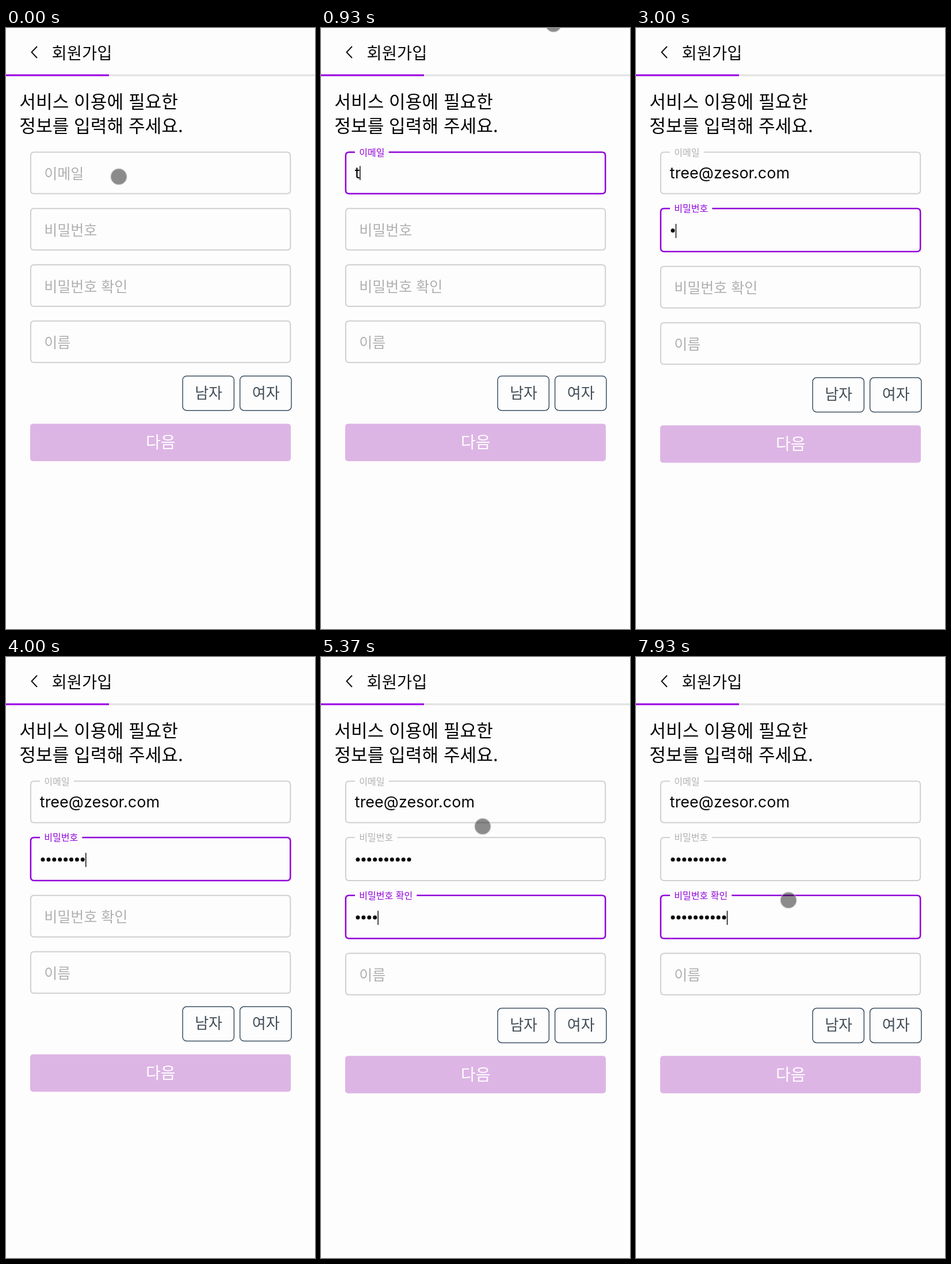
Animation of 537 by 1043 pixels, one loop 8000 ms. Source, as an HTML page:

```html
<!DOCTYPE html>
<html lang="ko">
<head>
<meta charset="utf-8">
<title>회원가입</title>
<style>
  html, body { margin: 0; width: 100%; height: 100%; overflow: hidden; background: #fdfdfd; }
  svg { display: block; width: 537px; height: 1043px; }
  text { font-family: "Noto Sans CJK KR", "Noto Sans CJK", sans-serif; font-weight: 500; }
  .entry { font-family: Inter, "Noto Sans", sans-serif; font-weight: 400; white-space: pre; }
</style>
</head>
<body>
<svg id="stage" viewBox="0 0 537 1043"></svg>
<script>
const LOOP = 8000;
const FOCUS_MS = 167;
const GROWTH = 2.8;
const DOT_STEP = 9.9;
const EMAIL = 'tree@zesor.com';
const GRAY = [208, 208, 210];
const HINT = [176, 176, 176];
const PURPLE = [145, 0, 218];

// Focus and blur times, and the time of each keystroke
const fields = [
  { label: '이메일', focus: 100, blur: 2760, value: EMAIL,
    keys: [900, 1030, 1140, 1250, 1600, 1900, 2000, 2110, 2220, 2310, 2390, 2460, 2570, 2670] },
  { label: '비밀번호', focus: 2760, blur: 4597,
    keys: [2970, 3080, 3200, 3310, 3600, 3720, 3850, 3970, 4090, 4210] },
  { label: '비밀번호 확인', focus: 4597, blur: Infinity,
    keys: [4880, 5000, 5130, 5330, 6730, 6900, 6970, 7130, 7270, 7460] },
  { label: '이름', focus: Infinity, blur: Infinity, keys: [] }
];

// Pointer position: time, x, y
const pointerPath = [
  [0, 196, 258], [250, 196, 258], [890, 404, -7], [2750, 404, -7],
  [5230, 276, 278], [5370, 281, 294], [5560, 282, 300],
  [7580, 282, 300], [7930, 265, 422]
];

const stage = document.getElementById('stage');
const clamp = v => Math.max(0, Math.min(1, v));
const lerp = (a, b, p) => a + (b - a) * p;
const smooth = p => p * p * (3 - 2 * p);
const easeOut = p => 1 - (1 - p) ** 2;
const mix = (a, b, p) => `rgb(${a.map((v, i) => Math.round(lerp(v, b[i], p)))})`;

function set(node, attrs) {
  for (const key in attrs) node.setAttribute(key, attrs[key]);
  return node;
}

function add(parent, tag, attrs) {
  const node = document.createElementNS('http://www.w3.org/2000/svg', tag);
  return parent.appendChild(set(node, attrs));
}

// Places text by its visual middle
function addText(parent, string, x, middle, size, fill, anchor = 'start') {
  const node = add(parent, 'text', {
    x, y: middle + size * 0.37, 'font-size': size, fill, 'text-anchor': anchor
  });
  node.textContent = string;
  return node;
}

function buildHeader() {
  add(stage, 'path', { d: 'M54 32 L44.5 42 L54 52', fill: 'none', stroke: '#111', 'stroke-width': 2 });
  addText(stage, '회원가입', 79.5, 43.7, 28.5, '#0a0a0a');
  add(stage, 'rect', { x: 0, y: 80.5, width: 537, height: 3, fill: '#e1e1e1' });
  add(stage, 'rect', { x: 0, y: 80.5, width: 179, height: 3, fill: '#9b00e8' });
  addText(stage, '서비스 이용에 필요한', 23.3, 127.3, 31.2, '#050505');
  addText(stage, '정보를 입력해 주세요.', 23.3, 169.3, 31.2, '#050505');
}

function buildField(field) {
  const group = field.group = add(stage, 'g', {});
  field.border = add(group, 'path', { fill: 'none' });
  field.tag = addText(group, field.label, 66.3, 0, 16, '#000');
  field.gap = field.tag.getComputedTextLength() + 14.5;
  if (field.value) {
    field.entry = add(group, 'text', { class: 'entry', x: 58.8, y: 45, 'font-size': 27, fill: '#080808' });
  } else {
    field.dots = field.keys.map((_, i) =>
      add(group, 'circle', { cx: 64 + DOT_STEP * i, r: 3.5, fill: '#080808' }));
  }
  field.caret = add(group, 'rect', { width: 1.5, height: 24.5, fill: '#111' });
}

function buildFooter() {
  const group = add(stage, 'g', {});
  [['남자', 307], ['여자', 406.6]].forEach(([label, x]) => {
    add(group, 'rect', {
      x, y: 604, width: 89.3, height: 59.8, rx: 7,
      fill: 'none', stroke: '#3c5062', 'stroke-width': 1.5
    });
    addText(group, label, x + 45.1, 633, 26, '#424d57', 'middle');
  });
  add(group, 'rect', { x: 42, y: 686.7, width: 453, height: 65, rx: 5, fill: '#ddb5e5' });
  addText(group, '다음', 268.7, 719, 28, '#fff', 'middle');
  return group;
}

// Rounded outline whose top edge is open from x = 59 by the gap
function outline(height, gap) {
  const l = 42.9, r = 494.2, c = 6;
  const end = gap > 0 ? 'L59 0' : 'L59 0 Z';
  return `M${59 + gap} 0 L${r - c} 0 Q${r} 0 ${r} ${c} L${r} ${height - c} Q${r} ${height} ${r - c} ${height} ` +
    `L${l + c} ${height} Q${l} ${height} ${l} ${height - c} L${l} ${c} Q${l} 0 ${l + c} 0 ${end}`;
}

function drawField(field, top, t) {
  const typed = field.keys.filter(k => k <= t).length;
  const grown = field.dots && typed ? GROWTH : 0;
  const rise = easeOut(clamp((t - field.focus) / FOCUS_MS));
  const fade = smooth(clamp((t - field.blur) / FOCUS_MS));
  const active = rise * (1 - fade);
  const size = lerp(25, 16, rise);

  set(field.group, { transform: `translate(0 ${top})` });
  set(field.border, {
    d: outline(72 + grown, field.gap * clamp((rise - 0.75) * 4)),
    stroke: mix(GRAY, PURPLE, active),
    'stroke-width': lerp(2, 2.5, active)
  });
  set(field.tag, {
    y: lerp(37.5, 0.2, rise) + size * 0.37,
    'font-size': size,
    fill: mix(HINT, PURPLE, active)
  });

  let caretX = 58.8 + DOT_STEP * typed;
  if (field.entry) {
    field.entry.textContent = field.value.slice(0, typed);
    caretX = 58.3 + (typed ? field.entry.getComputedTextLength() : 0);
  } else {
    field.dots.forEach((dot, i) => set(dot, { cy: 35.6 + grown, opacity: i < typed ? 1 : 0 }));
  }
  const focused = t >= field.focus && t < field.blur;
  const last = typed ? field.keys[typed - 1] : field.focus;
  const lit = focused && (t - last) % 1000 < 500;
  set(field.caret, { x: caretX, y: 23.9 + grown, opacity: lit ? 1 : 0 });
  return grown;
}

function drawPointer(t) {
  let i = pointerPath.length - 1;
  while (pointerPath[i][0] > t) i--;
  const from = pointerPath[i];
  const to = pointerPath[i + 1] || from;
  const p = to === from ? 0 : smooth((t - from[0]) / (to[0] - from[0]));
  set(pointer, {
    cx: lerp(from[1], to[1], p),
    cy: lerp(from[2], to[2], p),
    opacity: t >= 2750 && t < 5230 ? 0 : 1
  });
}

function draw(t) {
  let shift = 0;
  fields.forEach((field, i) => {
    shift += drawField(field, 215.5 + 97.7 * i + shift, t);
  });
  set(footer, { transform: `translate(0 ${shift})` });
  drawPointer(t);
}

buildHeader();
fields.forEach(buildField);
const footer = buildFooter();
const pointer = add(stage, 'circle', {
  r: 13.8, fill: 'rgba(0,0,0,.45)', stroke: 'rgba(190,190,190,.75)', 'stroke-width': 1.4
});

const start = performance.now();
function tick() {
  draw((performance.now() - start) % LOOP);
  requestAnimationFrame(tick);
}
tick();
</script>
</body>
</html>
```
